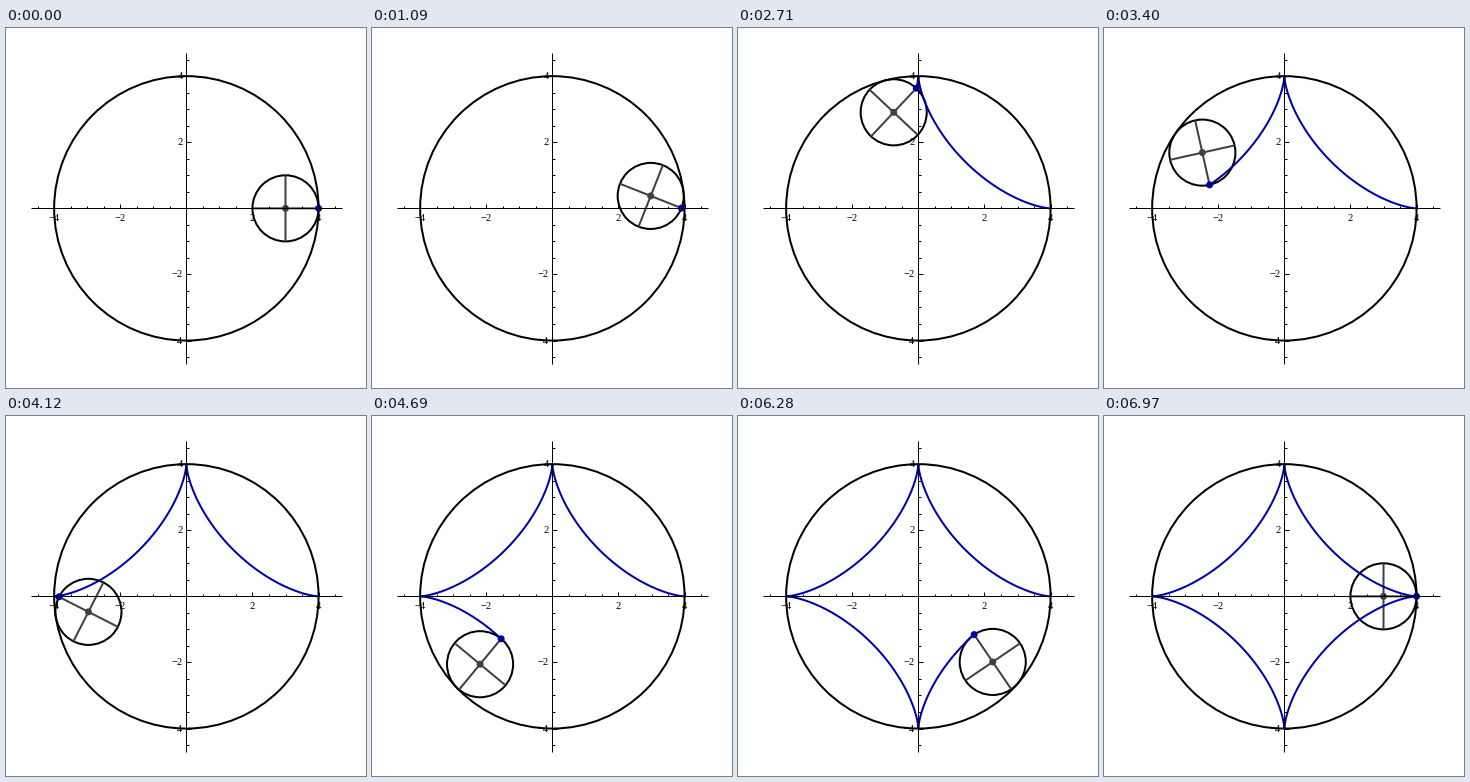
Animation of 360x360 px, one loop 7.97 s. Source, as a matplotlib script:

```python
import numpy as np
import matplotlib.pyplot as plt
from matplotlib.animation import FuncAnimation
from matplotlib.patches import Circle

SIZE = 360          # stage in pixels; at 72 dpi one point is one pixel
MID = 180.35        # origin in pixels
UNIT = 33.05        # pixels per unit
LIMIT = 4.7         # reach of the coordinate axes
STEPS = 200         # steps in one trip round the big circle
STEP_MS, HOLD_MS, TICK_MS = 30, 1000, 10
LOOP_MS = HOLD_MS + (STEPS - 1) * STEP_MS + HOLD_MS
BLUE = (0, 0, 2 / 3)
GRAY = (0.25, 0.25, 0.25)

fig = plt.figure(figsize=(SIZE / 72, SIZE / 72), dpi=72, facecolor="white")
ax = fig.add_axes([0, 0, 1, 1])
ax.set_xlim(-MID / UNIT, (SIZE - MID) / UNIT)
ax.set_ylim((MID - SIZE) / UNIT, MID / UNIT)
ax.axis("off")


def ring(radius, z):
    return ax.add_patch(Circle((0, 0), radius, fill=False, ec="black", lw=2, zorder=z))


def dot(color, z):
    return ax.add_patch(Circle((0, 0), 3.5 / UNIT, fc=color, lw=0, zorder=z))


def line(color, z):
    return ax.plot([], [], color=color, lw=2, solid_capstyle="butt",
                   snap=False, zorder=z)[0]


def draw_axes():
    style = dict(colors="black", lw=1, zorder=10)
    ax.hlines(0, -LIMIT, LIMIT, **style)
    ax.vlines(0, -LIMIT, LIMIT, **style)
    for v in np.arange(-4.5, 5, 0.5):
        if v == 0:
            continue
        major = v % 2 == 0
        length = (4.5 if major else 2.5) / UNIT
        ax.vlines(v, 0, length, **style)
        ax.hlines(v, 0, length, **style)
        if major:
            label = f"{v:.0f}".replace("-", "\u2212")
            font = dict(family="Liberation Serif", size=10.5, va="baseline", zorder=11)
            ax.text(v, -12.5 / UNIT, label, ha="center", **font)
            ax.text(-3.5 / UNIT, v - 3 / UNIT, label, ha="right", **font)


def astroid(a):
    return 3 * np.cos(a) + np.cos(3 * a), 3 * np.sin(a) - np.sin(3 * a)


ring(4, 1)
wheel = ring(1, 2)
spokes = [line(GRAY, 3) for _ in range(2)]
hub = dot(GRAY, 4)
trace = line(BLUE, 5)
pen = dot((0, 0, 0.6), 6)
draw_axes()


def update(frame):
    t = frame * TICK_MS
    step = 0 if t < HOLD_MS else min(STEPS, (t - HOLD_MS) // STEP_MS + 1)
    angle = 2 * np.pi * step / STEPS
    cx, cy = 3 * np.cos(angle), 3 * np.sin(angle)

    wheel.center = hub.center = cx, cy
    for i, spoke in enumerate(spokes):
        turn = -3 * angle + i * np.pi / 2
        dx, dy = np.cos(turn), np.sin(turn)
        spoke.set_data([cx - dx, cx + dx], [cy - dy, cy + dy])

    pen.center = astroid(angle)
    if step:
        trace.set_data(*astroid(np.linspace(0, angle, 2 * step + 1)))
    else:
        trace.set_data([], [])
    return [wheel, *spokes, hub, trace, pen]


anim = FuncAnimation(fig, update, frames=LOOP_MS // TICK_MS, interval=TICK_MS,
                     init_func=lambda: update(0), repeat=True, repeat_delay=0)
plt.show()
```
